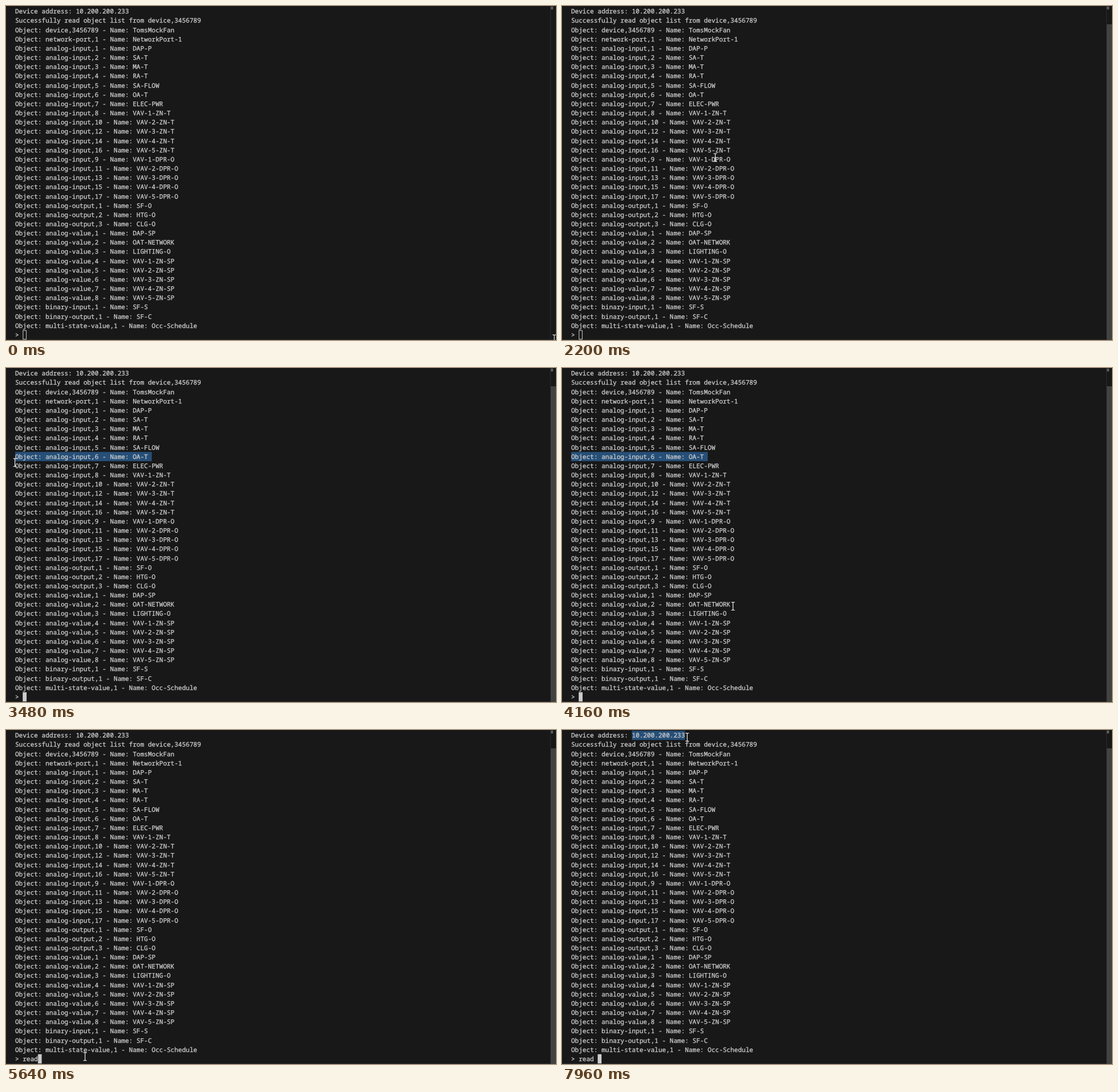
An HTML page for the animation above (8000 ms loop, 960 by 584 pixels).

```html
<!DOCTYPE html>
<html lang="en">
<head>
<meta charset="utf-8">
<title>Terminal session</title>
<style>
  html, body { margin: 0; width: 100%; height: 100%; overflow: hidden; background: #181818; }
  svg { display: block; width: 960px; height: 584px; }
  text {
    font: 11.04px "Noto Sans Mono", "DejaVu Sans Mono", monospace;
    fill: #ccc; stroke: #ccc; stroke-width: 0.3px;
    white-space: pre; text-rendering: geometricPrecision;
  }
</style>
</head>
<body>
<svg viewBox="0 0 960 584">
  <rect width="960" height="584" fill="#181818"/>
  <rect y="583" width="960" height="1" fill="#2b2b2b"/>
  <rect x="950" width="1" height="584" fill="#2b2b2b"/>
  <rect id="slider" x="951" y="32" width="9" height="552" fill="#424242"/>
  <rect x="951" y="1" width="4" height="5" fill="#5a5a5a"/>
  <rect id="selection" fill="#264f78"/>
  <g id="lines"></g>
  <rect id="caret" stroke="#ccc"/>
  <path id="pointer" d="M-3 -7H-1L0 -6L1 -7H3M0 -6V6M-3 7H-1L0 6L1 7H3" fill="none" stroke="#fff" stroke-width="1.1"/>
</svg>
<script>
const LOOP = 8000, STEP = 40;
const LEFT = 16, TOP = 1.3, CELL = 6.624, ROW = 16.16;
const $ = id => document.getElementById(id);
const setAttrs = (el, attrs) => {
  for (const name in attrs) el.setAttribute(name, attrs[name]);
  return el;
};
const clamp = (v, lo, hi) => Math.min(hi, Math.max(lo, v));
const progress = (t, start, end) => clamp((t - start) / (end - start), 0, 1);
const ease = u => u * u * (3 - 2 * u);

// Terminal text
const lines = ["Device address: 10.200.200.233", "Successfully read object list from device,3456789"];
const addObject = (type, id, name) => lines.push(`Object: ${type},${id} - Name: ${name}`);
const addObjects = (type, names) => names.split(" ").forEach((name, i) => addObject(type, i + 1, name));
const addZones = (type, suffix, idOf) => {
  for (let zone = 1; zone <= 5; zone++) addObject(type, idOf(zone), `VAV-${zone}-${suffix}`);
};
addObject("device", 3456789, "TomsMockFan");
addObjects("network-port", "NetworkPort-1");
addObjects("analog-input", "DAP-P SA-T MA-T RA-T SA-FLOW OA-T ELEC-PWR");
addZones("analog-input", "ZN-T", zone => 6 + 2 * zone);
addZones("analog-input", "DPR-O", zone => 7 + 2 * zone);
addObjects("analog-output", "SF-O HTG-O CLG-O");
addObjects("analog-value", "DAP-SP OAT-NETWORK LIGHTING-O");
addZones("analog-value", "ZN-SP", zone => 3 + zone);
addObjects("binary-input", "SF-S");
addObjects("binary-output", "SF-C");
addObjects("multi-state-value", "Occ-Schedule");

function addLine(content, row) {
  const el = document.createElementNS("http://www.w3.org/2000/svg", "text");
  setAttrs(el, { x: LEFT, y: TOP + row * ROW + 12 }).textContent = content;
  return $("lines").appendChild(el);
}
lines.forEach(addLine);
const promptRow = lines.length;
const prompt = addLine("> ", promptRow);

// Eased pointer moves; those with a select drag from column "anchor" to column "edge"
const home = { x: 957, y: 582 };
const moves = [
  { start: 120, end: 280, x: 669, y: 392 },
  { start: 900, end: 1370, x: 246, y: 194 },
  { start: 1380, end: 1760, x: 276, y: 351 },
  { start: 2000, end: 2400, x: 259, y: 179 },
  { start: 2520, end: 2760, x: 272, y: 158 },
  { start: 2800, end: 3320, x: 13, y: 163, select: { row: 9, anchor: 36, edge: 0 } },
  { start: 3440, end: 4160, x: 298.5, y: 416.5 },
  { start: 4180, end: 4480, x: 18, y: 414, select: { row: 25, anchor: 42, edge: 0 } },
  { start: 4520, end: 4960, x: 138, y: 571 },
  { start: 6780, end: 7060, x: 166, y: 32 },
  { start: 7060, end: 7240, x: 124, y: 11 },
  { start: 7260, end: 7880, x: 218.5, y: 12.5, select: { row: 0, anchor: 16, edge: 30 } }
];
const DRAG_LAG = 20;
const drags = moves.filter(move => move.select);

function pointerAt(t) {
  let { x, y } = home;
  for (const move of moves) {
    const u = ease(progress(t, move.start, move.end));
    x += (move.x - x) * u;
    y += (move.y - y) * u;
  }
  return { x, y };
}

// The command is typed at an even pace, its closing space after a pause
const TYPING_START = 5200, KEY_TIME = 146, SPACE_TIME = 6400;
const typedAt = t =>
  "read".slice(0, Math.max(0, Math.floor((t - TYPING_START) / KEY_TIME) + 1)) + (t >= SPACE_TIME ? " " : "");

function drawSelection(t) {
  const drag = drags.filter(d => t > d.start).pop();
  const cleared = drag && drag.start < TYPING_START && t >= TYPING_START;
  if (!drag || cleared) return setAttrs($("selection"), { width: 0, height: 0 });
  const { row, anchor, edge } = drag.select;
  const { x } = pointerAt(Math.min(t - DRAG_LAG, drag.end));
  const col = clamp(Math.round((x - LEFT) / CELL), Math.min(anchor, edge), Math.max(anchor, edge));
  setAttrs($("selection"), {
    x: LEFT + Math.min(col, anchor) * CELL, y: TOP + row * ROW,
    width: Math.abs(col - anchor) * CELL, height: ROW
  });
}

function draw(t) {
  const command = "> " + typedAt(t);
  const { x, y } = pointerAt(t);
  prompt.textContent = command;
  setAttrs($("caret"), {
    x: LEFT + command.length * CELL + 0.5, y: TOP + promptRow * ROW + 0.5,
    width: CELL - 1, height: ROW - 1, fill: t >= drags[0].start ? "#ccc" : "none"
  });
  setAttrs($("slider"), { opacity: progress(t, 140, 260) });
  setAttrs($("pointer"), { transform: `translate(${x} ${y})` });
  drawSelection(t);
}

const began = performance.now();
function tick() {
  const t = (performance.now() - began) % LOOP;
  draw(Math.floor(t / STEP) * STEP);
  requestAnimationFrame(tick);
}
tick();
</script>
</body>
</html>
```
